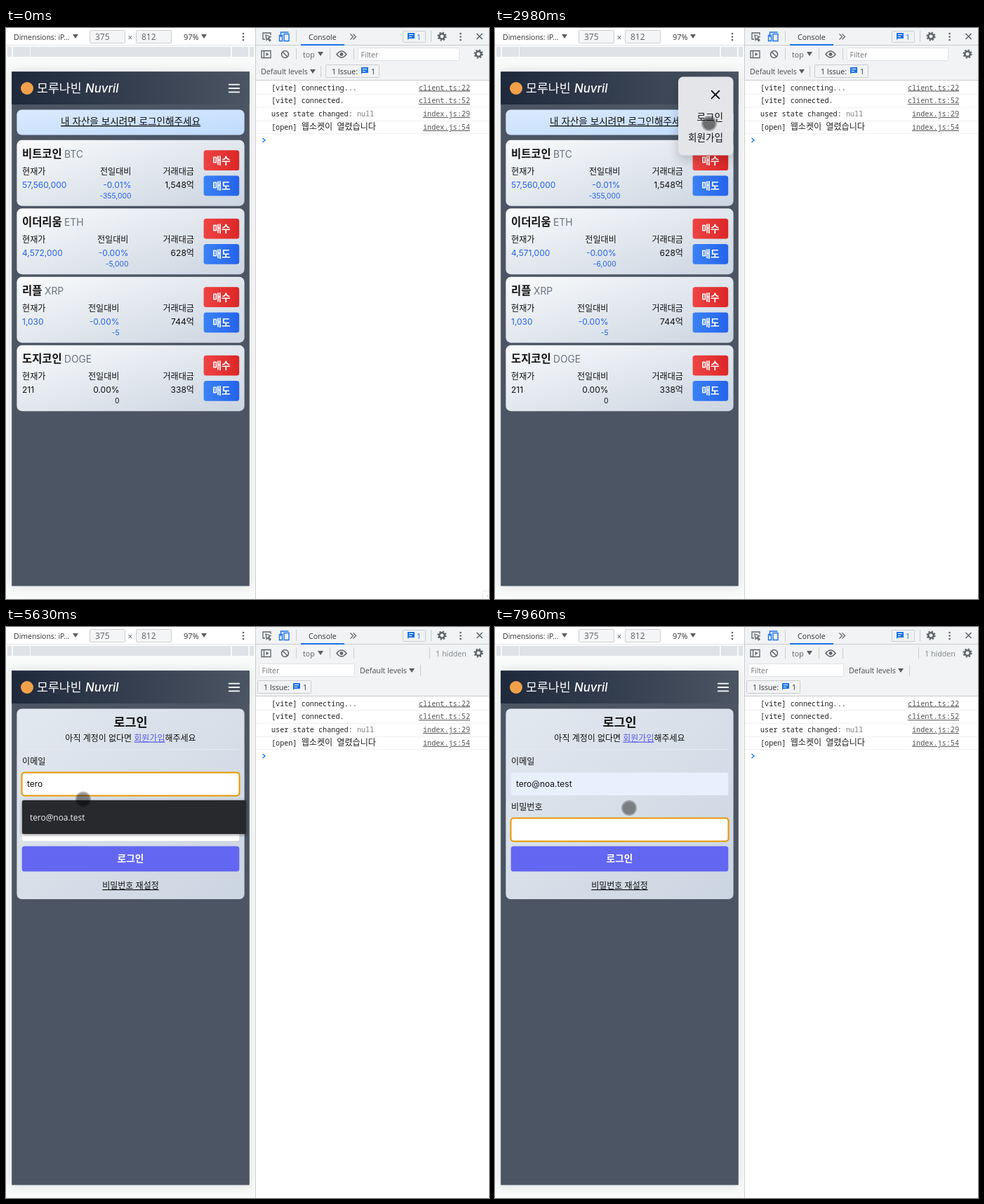
An HTML page that plays this animation: 688 by 814 pixels, repeating every 8 s.

```html
<!DOCTYPE html>
<html lang="ko">
<head>
<meta charset="utf-8">
<title>Exchange login</title>
<style>
html, body { margin: 0; width: 100%; height: 100%; overflow: hidden; background: #fff; }
svg { display: block; width: 688px; height: 814px; }
text { white-space: pre; }
.app { font-family: Inter, 'Noto Sans CJK KR', 'Noto Sans CJK', sans-serif; }
.ui { font-family: 'Open Sans', 'Noto Sans CJK KR', sans-serif; }
.mono { font-family: 'Noto Sans Mono', 'Noto Sans CJK KR', monospace; }
.m { font-weight: 500; }
.b { font-weight: 700; }
.u { text-decoration: underline; }
.low { text-underline-offset: 3px; }
#screen { filter: drop-shadow(0 0 8px rgba(0, 0, 0, .12)); }
#menu { filter: drop-shadow(0 6px 8px rgba(0, 0, 0, .2)); }
#popup { filter: drop-shadow(0 1px 2px rgba(0, 0, 0, .5)); }
</style>
</head>
<body>
<script>
const LOOP = 8000, MAIL = 'tero@noa.test';
const BLUE = '#2563eb', GREY = '#5f6368', LINE = '#cacdd1', PALE = '#e0e2e5';

const text = (x, y, s, size, fill = '#111', more = '') =>
  `<text x="${x}" y="${y}" font-size="${size}" fill="${fill}" ${more}>${s}</text>`;
const rect = (x, y, w, h, fill, r = 0, more = '') =>
  `<rect x="${x}" y="${y}" width="${w}" height="${h}" rx="${r}" fill="${fill}" ${more}/>`;
const path = (d, color, w = 1, fill = 'none', more = '') =>
  `<path d="${d}" stroke="${color}" stroke-width="${w}" fill="${fill}" ${more}/>`;
const dot = (x, y, r, fill, more = '') => `<circle cx="${x}" cy="${y}" r="${r}" fill="${fill}" ${more}/>`;
const group = (id, s, more = '') => `<g id="${id}" ${more}>${s}</g>`;
const grad = (id, a, b, y2 = 1) =>
  `<linearGradient id="${id}" x2="1" y2="${y2}"><stop stop-color="${a}"/><stop offset="1" stop-color="${b}"/></linearGradient>`;
const END = 'text-anchor="end"', MID = 'text-anchor="middle"', ROUND = 'stroke-linecap="round"';

// toolbar parts
const tri = (x, y) => path(`M${x - 4} ${y - 3}h8l-4 6z`, 'none', 0, '#5a5d61');
const sep = (x, y) => path(`M${x}.5 ${y - 8}v16`, LINE);
const dots = (x, y) => [-4.5, 0, 4.5].map(d => dot(x, y + d, 1.3, GREY)).join('');
const gear = (x, y) =>
  dot(x, y, 3.8, 'none', `stroke="${GREY}" stroke-width="2.6"`) +
  dot(x, y, 5.6, 'none', `stroke="${GREY}" stroke-width="2" stroke-dasharray="2.2 2.2"`);
const chat = (x, y) =>
  path(`M${x - 5} ${y - 5}h10v8h-8l-2 2z`, 'none', 0, '#1a73e8') +
  path(`M${x - 3} ${y - 2.5}h6M${x - 3} ${y + .5}h4`, '#fff');
const field = (x, y, w, h, fill = '#fff', line = LINE) =>
  rect(x + .5, y + .5, w - 1, h - 1, fill, 1, `stroke="${line}"`);
const filter = (x, y, w) =>
  field(x, y, w, 19, '#fff', PALE) + text(x + 4.5, y + 14, 'Filter', 10.6, '#757575');
const issues = (x, y) =>
  field(x, y, 77, 19, '#f1f3f4') + text(x + 9, y + 13.5, '1 Issue:', 10.6, '#333') +
  chat(x + 56, y + 9) + text(x + 65, y + 13.5, '1', 10.6, '#333');
const levels = x => text(x, 66, 'Default levels', 10.7, '#4b4e52') + tri(x + 74, 62);

function deviceBar() {
  const bands = [[2, 6], [10, 24], [35, 285], [322, 23], [347, 6]];
  return rect(0, 0, 355, 814, '#f9fafa') + rect(0, 0, 355, 24, '#fff') +
    rect(0, 24, 355, 1, '#e4e6e8') +
    bands.map(([x, w]) => rect(x, 27, w, 14, '#dfe2e6')).join('') +
    text(11, 16.5, 'Dimensions: iP...', 10.5, '#333') + tri(99, 12) +
    field(119, 3, 51, 19, '#f4f5f6') + text(127, 17, '375', 12, GREY) +
    text(173.5, 17.5, '×', 12, GREY) +
    field(185, 3, 51, 19, '#f4f5f6') + text(193, 17, '812', 12, GREY) +
    text(253, 16.5, '97%', 11, '#333') + tri(282, 12) + dots(338, 12.5);
}

function tools() {
  const head =
    rect(355, 0, 333, 814, '#fff') + group('toolBg', rect(356, 0, 332, 98, '#f1f3f4')) +
    path('M356 24.5h332', LINE) +
    path('M369 16h-3V7h11v3M370 10l7 2.5-3 1.5 3 3.5-1.5 1.2-2.5-3.5-1.8 2z', GREY, 1.3) +
    path('M391.5 13V6h11M396 8.5h7v10h-7zM389.5 10.5h4v8h-4z', '#1a73e8', 1.4) +
    sep(413, 12) + text(431, 16.5, 'Console', 10.6, '#333') + rect(420, 23, 62, 2, '#1a73e8') +
    path('M490.5 8.5l4 4-4 4M494.5 8.5l4 4-4 4', GREY, 1.2) +
    field(565, 4, 33, 17, '#f1f3f4') + chat(577, 12) + text(585, 16.5, '1', 10.6, '#1a73e8') +
    sep(605, 12) + gear(621, 12) + dots(647.5, 12.5) + path('M670.5 8l8 8M678.5 8l-8 8', GREY, 1.5) +
    path('M364 32.5h13v10h-13zM367.5 32.5v10', GREY, 1.3) +
    path('M370.5 35l4 2.5-4 2.5z', 'none', 0, GREY) +
    dot(397.5, 37.5, 5, 'none', `stroke="${GREY}" stroke-width="1.5"`) + path('M394 34l7 7', GREY, 1.5) +
    sep(413, 37) + text(423, 41.5, 'top', 10.6, GREY) + tri(448, 37) + sep(461, 37) +
    path('M471 37.5q7-9 14 0q-7 9-14 0z', GREY, 1.4) + dot(478, 37.5, 2.4, GREY) + sep(495, 37) +
    gear(673, 37);
  const wide = filter(501, 28, 145) + levels(363) + sep(448, 62) + issues(455, 52) +
    path('M356 74.5h332', LINE);
  const narrow = sep(603, 37) + text(612, 41.5, '1 hidden', 10.7, '#80868b') +
    filter(360, 52, 137) + levels(504) + sep(590, 62) + issues(358, 76) + path('M356 98.5h332', LINE);
  return head + group('wide', wide) + group('narrow', narrow);
}

function log() {
  const rows = [
    ['[vite] connecting...', 'client.ts:22'],
    ['[vite] connected.', 'client.ts:52'],
    ['user state changed: <tspan fill="#808080">null</tspan>', 'index.js:29'],
    ['[open] <tspan font-size="12.1">웹소켓이</tspan> <tspan font-size="12.1">열렸습니다</tspan>', 'index.js:54']
  ];
  return rows.map(([msg, link], i) => {
    const y = 88.5 + i * 18.8;
    return text(378, y, msg, 10.17, '#222') + text(661, y, link, 10.17, '#545454', `${END} class="u"`) +
      path(`M356 ${Math.round(y + 5.5) + .5}h332`, '#f0f0f0');
  }).join('') + path('M365.5 157l3.5 3-3.5 3', '#1a73e8', 1.4);
}

const cardTop = i => 159.8 + i * 97.5;

function card(i, name, tick, tickX) {
  const y = cardTop(i);
  const button = (dy, label, fill) =>
    rect(281.6, y + dy, 50.6, 28.9, fill, 3.6) + text(306.9, y + dy + 19.5, label, 13.8, '#fff', `${MID} class="b"`);
  return rect(15.4, y, 324.2, 93.9, 'url(#card)', 7.2) +
    text(23, y + 25, name, 15.4, '#111', 'class="b"') +
    text(tickX, y + 25, tick, 13.8, '#6b7280') +
    text(23, y + 49, '현재가', 12.1, '#111', 'class="m"') +
    text(268, y + 49, '거래대금', 12.1, '#111', `${END} class="m"`) +
    button(14.4, '매수', 'url(#buy)') + button(50.6, '매도', 'url(#sell)');
}

function stats(i, price, right, pct, diff, volume, fill = BLUE) {
  const y = cardTop(i);
  return text(right, y + 49, '전일대비', 12.1, '#111', `${END} class="m"`) +
    text(23, y + 68, price, 12, fill) + text(right, y + 68, pct, 12, fill, END) +
    text(right, y + 83, diff, 10.3, fill, END) + text(268, y + 68, volume, 12.1, '#111', END);
}

const home = () =>
  rect(15.4, 116.4, 324.2, 36.2, 'url(#banner)', 7.2) +
  text(177.5, 138, '내 자산을 보시려면 로그인해주세요', 13.58, '#111', `${MID} class="u low"`) +
  card(0, '비트코인', 'BTC', 83) + stats(0, '57,560,000', 178.5, '-0.01%', '-355,000', '1,548억') +
  card(1, '이더리움', 'ETH', 83) +
  group('ethA', stats(1, '4,572,000', 174.5, '-0.00%', '-5,000', '628억')) +
  group('ethB', stats(1, '4,571,000', 172.8, '-0.00%', '-6,000', '628억')) +
  card(2, '리플', 'XRP', 55) + stats(2, '1,030', 161.5, '-0.00%', '-5', '744억') +
  card(3, '도지코인', 'DOGE', 83) + stats(3, '211', 161.5, '0.00%', '0', '338억', '#111');

const ring = (id, y) =>
  group(id, rect(22.5, y, 310, 33, 'none', 4, 'stroke="#e59700" stroke-width="2"'));

const login = () =>
  rect(15.4, 116.4, 324.2, 271.6, 'url(#form)', 7.2) +
  text(177.5, 142, '로그인', 17.46, '#111', `${MID} class="b"`) +
  text(177.5, 162.5, '아직 계정이 없다면 <tspan fill="#5b5cf0" class="u">회원가입</tspan>해주세요', 12, '#111', `${MID} class="m"`) +
  path('M23 174.5h309', '#e4e9f0') +
  text(23, 196, '이메일', 12.1, '#111', 'class="m"') +
  rect(22.7, 207.5, 309.6, 32.5, '#fff', 3.6, 'id="mailBox"') +
  text(23, 260.5, '비밀번호', 12.1, '#111', 'class="m"') + rect(22.7, 272.5, 309.6, 32.5, '#fff', 3.6) +
  ring('ringMail', 207.5) + ring('ringPass', 272.5) +
  text(30, 228, '', 12, '#111', 'id="mail"') +
  group('caret', rect(0, 0, 1, 15, '#000')) +
  rect(22.7, 312.4, 309.6, 36.1, '#6366f1', 3.6) + text(177.5, 335, '로그인', 13.7, '#fff', `${MID} class="b"`) +
  text(177.5, 373, '비밀번호 재설정', 12, '#111', `${MID} class="u m"`) +
  group('popup', rect(23, 247, 319, 48, '#28292c', 2) + text(34, 275.5, MAIL, 11.9, '#f1f1f1'), 'class="ui"') +
  group('status', rect(8, 776, 111, 20, '#35363a', 1) + text(14, 790, '연결 중...', 11.6, '#cfd0d2'), 'class="ui"');

const menu = () =>
  rect(261, 69.5, 78.5, 112, '#e3e5e9', 7.2) +
  path('M308.6 89.6l10.8 10.8M319.4 89.6l-10.8 10.8', '#000', 1.8, 'none', ROUND) +
  text(325, 131.5, '로그인', 13.6, '#111', END) + text(325, 160.5, '회원가입', 13.6, '#111', END);

document.body.innerHTML = `<svg viewBox="0 0 688 814"><defs>
  ${grad('head', '#1e293b', '#4b5563', 0)}${grad('banner', '#dbeafe', '#bfdbfe')}
  ${grad('card', '#f9fafb', '#cbd5e1')}${grad('form', '#e2e8f0', '#cbd5e1')}
  ${grad('buy', '#ef4444', '#dc2626', 0)}${grad('sell', '#3b82f6', '#2563eb', 0)}
  <clipPath id="phone">${rect(8.2, 62.3, 338.6, 733.2, '#000')}</clipPath></defs>
  <g class="ui">${deviceBar()}${rect(8.2, 62.3, 338.6, 733.2, '#4b5563', 0, 'id="screen"')}
    ${tools()}${path('M355.5 0v814', LINE)}</g>
  ${group('log', log(), 'class="mono"')}
  ${group('corner', rect(678.5, 802.5, 14, 16, '#fff', 3, 'stroke="#e4e6e8"') + rect(685, 809, 2, 2, '#ccc'))}
  <g class="app" clip-path="url(#phone)">
    ${rect(8, 62, 339, 47, 'url(#head)')}
    ${dot(30, 86, 9, '#f2a04a')}
    ${text(44, 92, '모루나빈', 17.3, '#fff', 'class="m"')}
    ${text(113, 92, 'Nuvril', 16.8, '#fff', 'class="m" font-style="italic"')}
    ${path('M317.7 80.6h14.5M317.7 86h14.5M317.7 91.4h14.5', '#fff', 1.8, 'none', ROUND)}
    ${group('home', home())}${group('login', login())}${group('menu', menu())}
  </g>
  ${group('touch', dot(0, 0, 11, 'rgba(0,0,0,.28)') + dot(0, 0, 9, 'rgba(0,0,0,.21)') +
    group('press', dot(0, 0, 9, 'rgba(0,0,0,.16)')))}
  ${group('arrow', path('M0 0v16l3.7-3.5 2.4 5.6 2.3-1-2.4-5.4h5z', '#333', 1, '#fff'))}
</svg>`;

const $ = id => document.getElementById(id);
const show = (id, on) => $(id).setAttribute('visibility', on ? 'inherit' : 'hidden');
const move = (id, x, y) => $(id).setAttribute('transform', `translate(${x} ${y})`);
const part = (t, a, b) => Math.min(1, Math.max(0, (t - a) / (b - a)));

// time, x, y
const route = [
  [70, 700, 830], [520, 420, 270], [860, 318, 90], [1000, 328, 88], [1120, 328, 90],
  [1660, 328, 90], [1800, 328, 88], [2050, 328, 88], [2450, 307, 124], [2900, 305, 136],
  [3640, 305, 136], [3780, 272, 155], [4300, 116, 228], [5500, 116, 228],
  [5800, 102, 268], [6060, 102, 268], [6430, 173, 289], [7560, 173, 289], [7960, 191, 258]
];

function cursorAt(t) {
  const n = route.findIndex(k => k[0] > t);
  if (n === 0) return route[0].slice(1);
  if (n < 0) return route[route.length - 1].slice(1);
  const a = route[n - 1], b = route[n], p = part(t, a[0], b[0]);
  return [a[1] + (b[1] - a[1]) * p, a[2] + (b[2] - a[2]) * p];
}

const within = (t, ...spans) => spans.some(([a, b]) => t >= a && t < b);
const keys = [4500, 4570, 4840, 4970];

function draw(t) {
  const onLogin = t >= 3640, narrow = t >= 4050;
  show('corner', t < 70);
  show('home', !onLogin);
  show('login', onLogin);
  const ethLow = within(t, [1000, 3040]);
  show('ethA', !onLogin && !ethLow);
  show('ethB', !onLogin && ethLow);

  const slide = 1 - part(t, 1660, 2340);
  show('menu', within(t, [1660, 3310]));
  move('menu', 86 * slide * slide, 0);

  show('wide', !narrow);
  show('narrow', narrow);
  move('toolBg', 0, narrow ? 0 : -24);
  move('log', 0, narrow ? 24 : 0);
  show('status', within(t, [3640, 4050]));

  const filled = t >= 5700;
  const typed = filled ? MAIL : MAIL.slice(0, keys.filter(k => t >= k).length);
  const mail = $('mail');
  if (mail.textContent !== typed) mail.textContent = typed;
  $('mailBox').setAttribute('fill', filled ? '#e8f0fe' : '#fff');
  show('ringMail', within(t, [4500, 6930]));
  show('ringPass', t >= 6930);
  show('caret', within(t, [4500, 5500], [5900, 6400], [6930, 7560]));
  if (t < 6930) move('caret', 30.5 + (typed ? mail.getComputedTextLength() : 0), 216.5);
  else move('caret', 30, 281);

  const fade = part(t, 5920, 6060), size = 1 - .05 * fade, popup = within(t, [4500, 6060]);
  show('popup', popup);
  $('popup').setAttribute('opacity', 1 - fade);
  $('popup').setAttribute('transform', `translate(182.5 271) scale(${size}) translate(-182.5 -271)`);

  const [x, y] = cursorAt(t);
  const arrow = x > 347 || (popup && y > 247);
  show('arrow', t >= 70 && arrow);
  show('touch', t >= 70 && !arrow);
  show('press', t >= 70 && !arrow && within(t, [1390, 1450], [2900, 3250], [4370, 4430], [6900, 6960]));
  move('arrow', x, y);
  move('touch', x, y);
}

function tick() {
  draw(performance.now() % LOOP);
  requestAnimationFrame(tick);
}
tick();
</script>
</body>
</html>
```
